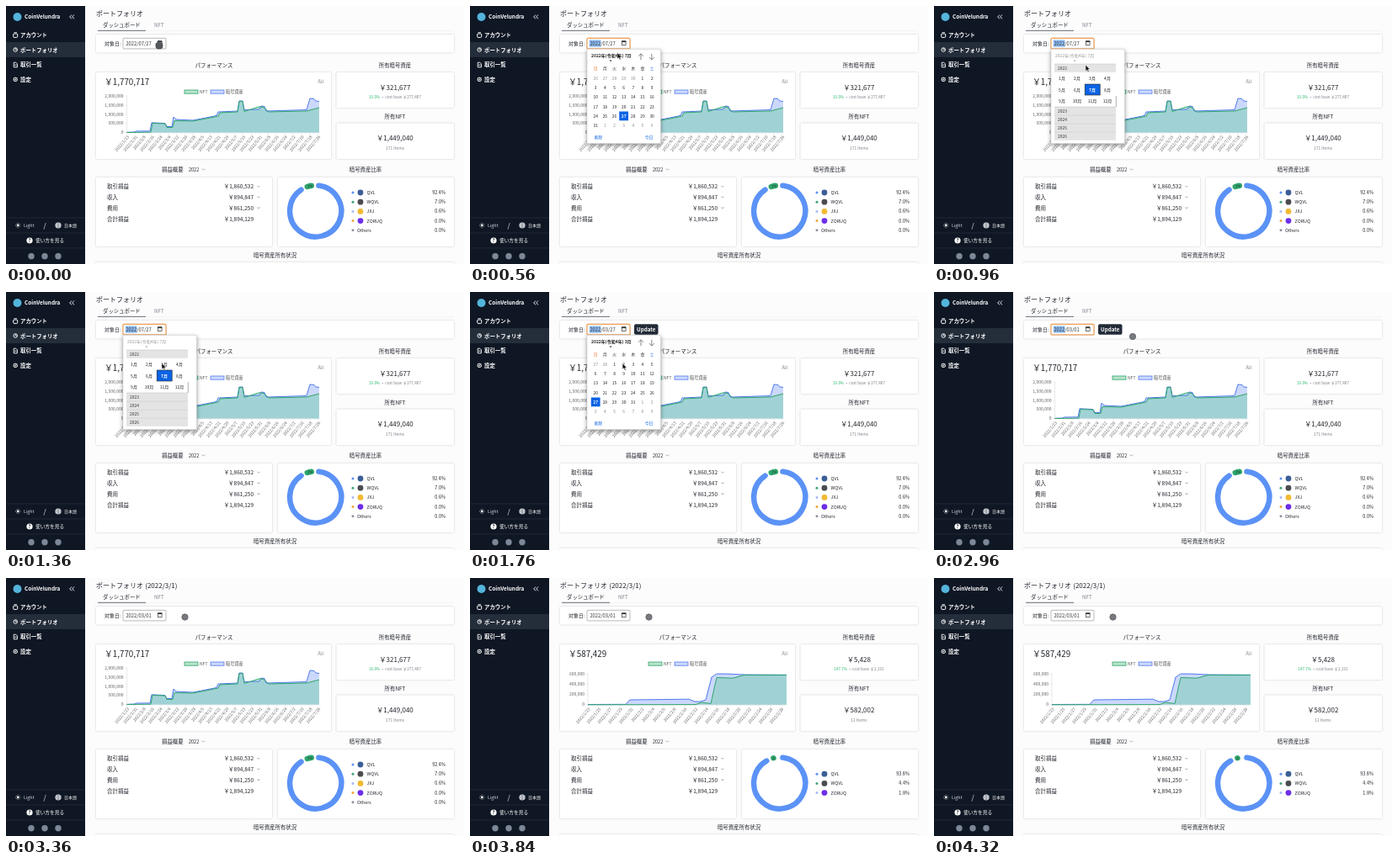
Write an HTML page that moves like this. It is 544x307 px and loops after 4.4 s.

```html
<!DOCTYPE html>
<html lang="ja">
<head>
<meta charset="utf-8">
<title>ポートフォリオ</title>
<style>
  html, body { margin: 0; width: 100%; height: 100%; overflow: hidden; background: #fcfcfd; }
  svg { display: block; width: 100vw; height: 100vh; }
  text { font-family: "Noto Sans CJK JP", "Noto Sans CJK", "Noto Sans", sans-serif; white-space: pre; }
  .card { fill: #fff; filter: drop-shadow(0 .6px .9px rgba(0,0,0,.2)); }
  .popup { fill: #fff; stroke: #c4c4c4; stroke-width: .5; filter: drop-shadow(0 2px 2.5px rgba(0,0,0,.4)); }
</style>
</head>
<body>
<svg id="stage" viewBox="0 0 544 307"></svg>
<script>
const LOOP = 4400, STEP = 80;
const INK = '#20242b', GRAY = '#7b818a', BLUE = '#5b92f6', GREEN = '#2fa56c', PICK = '#0b63e5';

const text = (x, y, s, size = 6.4, fill = INK, anchor = 'start', extra = '') =>
  `<text x="${x}" y="${y}" font-size="${size}" fill="${fill}" text-anchor="${anchor}" ${extra}>${s}</text>`;
const mid = (x, y, s, size, fill, extra) => text(x, y, s, size, fill, 'middle', extra);
const end = (x, y, s, size, fill, extra) => text(x, y, s, size, fill, 'end', extra);
const rect = (x, y, w, h, fill, extra = '') =>
  `<rect x="${x}" y="${y}" width="${w}" height="${h}" fill="${fill}" ${extra}/>`;
const card = (x, y, w, h) => `<rect class="card" x="${x}" y="${y}" width="${w}" height="${h}" rx="1.5"/>`;
const dot = (x, y, r, fill) => `<circle cx="${x}" cy="${y}" r="${r}" fill="${fill}"/>`;
const path = (d, stroke, width = .8, fill = 'none', extra = '') =>
  `<path d="${d}" stroke="${stroke}" stroke-width="${width}" fill="${fill}" ${extra}/>`;
const chevron = (x, y) => path(`M${x - 1.5} ${y - .8}l1.5 1.5l1.5-1.5`, GRAY, .7);
const range = (n, f) => Array.from({ length: n }, (_, i) => f(i)).join('');
const BOLD = 'font-weight="700"', MEDIUM = 'font-weight="500"';

// Layers are drawn in this order; each is visible from start to stop.
const layers = [];
const layer = (start, stop, markup) => layers.push({ start, stop, markup });

function sidebar() {
  const menu = ['アカウント', 'ポートフォリオ', '取引一覧', '設定'];
  const icons = [
    rect(8.7, 33, 5, 4.4, 'none', 'rx="1" stroke="#fff"') + path('M9.5 31.6h3.5', '#fff', .8),
    `<circle cx="11.2" cy="52" r="2.3" stroke="#fff" stroke-width=".9" fill="none"/>` + path('M11.2 50v2h2', '#fff'),
    path('M9.2 67.2h2.6l1.6 1.6v4h-4.2z M10 70.2h2.6', '#fff', .9),
    `<circle cx="11.2" cy="87.4" r="2.1" stroke="#fff" stroke-width="1.2" fill="none" stroke-dasharray="1.3 .35"/>` + dot(11.2, 87.4, .8, '#fff')
  ];
  const rule = y => path(`M0 ${y}H94`, '#2b3443', .6);
  return rect(0, 0, 94, 307, '#0f1724') + rect(0, 43, 94, 18, '#242d3a') +
    dot(13.5, 13, 5, '#55b4dc') +
    text(22, 15.4, 'CoinVelundra', 6.4, '#fff', 'start', BOLD) +
    path('M78 10.5l-2.3 2.4l2.3 2.4 M81 10.5l-2.3 2.4l2.3 2.4', '#fff', .9) +
    menu.map((s, i) => icons[i] + text(17, 37.2 + 17.6 * i, s, 6.4, '#fff', 'start', BOLD)).join('') +
    rule(252) + rule(270) + rule(288) +
    dot(14.2, 261, 1.4, '#fff') +
    range(8, i => path('M14.2 258.8v-1', '#fff', .6, 'none', `transform="rotate(${45 * i} 14.2 261)"`)) +
    text(21, 263, 'Light', 5.3, '#d5d9df') + mid(46, 264, '/', 8, '#fff') +
    dot(62, 261, 3.6, '#dfe2e6') + path('M58.4 261h7.2 M62 257.4v7.2 M59.5 259h5 M59.5 263h5', '#59616d', .5) +
    text(69, 263, '日本語', 5, '#fff') +
    dot(28, 279, 3.6, '#fff') + mid(28, 281, '?', 5.5, '#0f1724', BOLD) +
    text(35, 281.2, '使い方を見る', 5.7, '#fff') +
    dot(30, 297.8, 3.7, '#7c8797') + dot(46, 297.8, 3.7, '#7c8797') + dot(62, 297.8, 3.7, '#7c8797');
}

function frame() {
  const profit = [['取引損益', '￥1,860,532'], ['収入', '￥894,847'], ['費用', '￥861,250'], ['合計損益', '￥1,894,129']];
  return text(107, 12, 'ポートフォリオ', 8, INK, 'start', MEDIUM) +
    text(115, 25, 'ダッシュボード', 6.4) + text(176, 25, 'NFT', 6.2, GRAY) +
    path('M107 29.5H532', '#e8eaed', .5) + path('M109 29.3H166', '#414854', .8) +
    card(107, 34, 425, 21.5) + text(117, 47, '対象日:', 6) +
    mid(247, 73.4, 'パフォーマンス', 6.4, INK, MEDIUM) + card(107, 79, 279, 103) + end(377, 92, 'All', 5.5, GRAY) +
    mid(462, 73.4, '所有暗号資産', 6.4, INK, MEDIUM) + card(392.5, 79, 139.5, 42) +
    mid(462, 134, '所有NFT', 6.4, INK, MEDIUM) + card(392.5, 139.5, 139.5, 42.5) +
    text(185, 197, '損益概要', 6.4, INK, 'start', MEDIUM) + text(217, 196.6, '2022', 5.5) + chevron(234.5, 194.5) +
    card(107, 204, 209, 82) +
    profit.map(([k, v], i) => text(120, 217.2 + 12.8 * i, k, 6.5) + end(294, 217.2 + 12.8 * i, v, 6.5, INK, MEDIUM) +
      (i < 3 ? chevron(300, 214.7 + 12.8 * i) : '')).join('') +
    mid(427, 197, '暗号資産比率', 6.4, INK, MEDIUM) + card(323, 204, 209, 82) +
    mid(319.5, 299, '暗号資産所有状況', 6.4, INK, MEDIUM) + card(107, 305, 425, 20);
}

function chart({ left, right, base, ticks, top, labels, days, step, blue, green }) {
  const line = p => 'M' + p.map(q => q.join(' ')).join('L');
  const area = p => `${line(p)}V${base}H${p[0][0]}Z`;
  const gap = (base - top) / (ticks.length - 1);
  const key = (x, fill, stroke) => rect(x, 100, 16, 4.2, fill, `stroke="${stroke}" stroke-width=".8"`);
  const day = i => {
    const d = new Date(2022, 0, 23 + i * step);
    return `2022/${d.getMonth() + 1}/${d.getDate()}`;
  };
  return key(212, '#b9e3cc', GREEN) + text(230, 104, 'NFT', 5, '#555') +
    key(243, '#cbd8fd', '#557ef0') + text(261, 104, '暗号資産', 5.2, '#555') +
    ticks.map((s, i) => end(left - 4, base + 1.4 - gap * i, s, 5, '#666') + path(`M${left - 2.5} ${base - gap * i}h2.5`, '#ddd', .4)).join('') +
    path(`M${left} ${top - 2}V${base + .3}H${right}`, '#cfd2d6', .5) +
    range(labels, i => {
      const x = left + (right - left) * i * step / days;
      return path(`M${x} ${base}v2.5`, '#ddd', .4) +
        end(0, 0, day(i), 4.9, '#666', `transform="translate(${x + 3} ${base + 5.4}) rotate(-50)"`);
    }) +
    path(area(blue), 'none', 0, 'rgba(85,126,240,.3)') + path(area(green), 'none', 0, 'rgba(100,200,160,.42)') +
    path(line(blue), '#5079ee', 1) + path(line(green), GREEN, 1);
}

function arc(from, to, color) {
  const at = a => {
    const r = a * Math.PI / 180;
    return `${367.7 + 30.6 * Math.sin(r)} ${244 - 30.6 * Math.cos(r)}`;
  };
  return path(`M${at(from)}A30.6 30.6 0 ${to - from > 180 ? 1 : 0} 1 ${at(to)}`, color, 6.4, 'none', 'stroke-linecap="round"');
}

const dots = { QVL: BLUE, WQVL: '#3fa27b', JXJ: '#a9b8f8', ZORUQ: '#f2a33a', Others: '#8b93a0' };
const tokens = { QVL: '#3b5f97', WQVL: '#4a4c50', JXJ: '#f1b932', ZORUQ: '#6d2ee8' };
const shares = (rows, y) => rows.map(([name, pct, mark], i) => {
  const cy = y + 11.2 * i;
  return dot(412, cy, 1.5, mark || dots[name]) +
    (tokens[name] ? dot(421, cy, 3.4, tokens[name]) : '') +
    text(tokens[name] ? 428.5 : 417, cy + 2, name, 5.4) + end(522, cy + 2, pct, 5.5);
}).join('');

const summary = (total, coins, gain, cost, nft, items) =>
  text(117, 94, total, 9.8, INK, 'start', MEDIUM) +
  mid(462, 99.6, coins, 8, INK, MEDIUM) +
  mid(462, 110, `<tspan fill="#2eb872">${gain}</tspan>  •  cost base ${cost}`, 4.7, GRAY) +
  mid(462, 160, nft, 8, INK, MEDIUM) + mid(462, 171.2, items, 4.9, GRAY);

const julyView = () =>
  summary('￥1,770,717', '￥321,677', '16.0%', '￥277,407', '￥1,449,040', '171 Items') +
  chart({
    left: 143.5, right: 372, base: 150.5, top: 108, ticks: ['0', '500,000', '1,000,000', '1,500,000', '2,000,000'],
    labels: 24, days: 185, step: 8,
    blue: [[143.5, 150.3], [153, 150], [154, 149], [171, 148.8], [173, 138.8], [189, 139.6], [191, 143.5], [197, 143.5], [199, 132],
      [202, 135], [222, 136], [240, 132.5], [250, 130.5], [252, 126], [275, 125], [277, 113], [281, 113], [283, 123.5],
      [301, 123], [303, 119], [307, 119.5], [309, 125], [357, 123.5], [361, 110], [366, 110.5], [368, 113], [372, 113.5]],
    green: [[143.5, 150.5], [172, 150.2], [174, 139.5], [189, 140], [191, 144.5], [198, 144.5], [200, 136.5], [222, 137], [240, 133.5],
      [252, 131], [254, 127], [275, 126], [277, 113.5], [281, 113.5], [283, 125.5], [301, 119.8], [306, 120.5], [312, 126], [357, 125], [372, 121]]
  }) +
  arc(7, 326, BLUE) + arc(341, 351, GREEN) + mid(361, 216, '7%', 4, INK, 'transform="rotate(-14 361 214)"') +
  shares([['QVL', '92.4%'], ['WQVL', '7.0%'], ['JXJ', '0.6%'], ['ZORUQ', '0.0%'], ['Others', '0.0%']], 222);

const marchView = () =>
  summary('￥587,429', '￥5,428', '147.7%', '￥2,191', '￥582,002', '12 Items') +
  chart({
    left: 140, right: 376, base: 150.8, top: 115, ticks: ['0', '200,000', '400,000', '600,000'],
    labels: 19, days: 37, step: 2,
    blue: [[140, 150.5], [185, 150.3], [190, 145], [260, 144.2], [267, 147], [274, 147], [280, 145], [287, 118], [293, 114], [303, 114], [326, 115], [376, 115.3]],
    green: [[140, 150.8], [268, 150.6], [275, 148], [286, 149.5], [293, 118.5], [312, 119.2], [325, 115.6], [376, 115.6]]
  }) +
  arc(7, 330, BLUE) + arc(346, 346.5, GREEN) + mid(360.6, 216, '4', 4, INK) +
  shares([['QVL', '93.8%'], ['WQVL', '4.4%'], ['ZORUQ', '1.8%', dots.JXJ]], 233.2);

const dateIcon = rect(180.3, 41.8, 4.8, 4.8, 'none', 'stroke="#333" stroke-width=".7"') + rect(180.3, 41.5, 4.8, 1.6, '#333');
const field = (stroke, width) => rect(139, 38.3, 51, 12.6, '#fff', `rx="1" stroke="${stroke}" stroke-width="${width}"`) + dateIcon;
const button = rect(195, 38.2, 28.5, 12.6, '#222b38', 'rx="2"') + mid(209.2, 46.9, 'Update', 6.2, '#fff', BOLD);
const popup = '<rect class="popup" x="139" y="51.2" width="87.5" height="112.5"/>';
const heading = (month, fill, extra) => text(144, 60.8, `2022年(令和4年) ${month}月`, 5, fill, 'start', extra) +
  path('M165.5 64.6h3l-1.5 1.7z', 'none', 0, fill);

function calendar(month, picked) {
  const col = i => 149.2 + 11.15 * i, row = i => 86.3 + 11.15 * i;
  const first = new Date(2022, month - 1, 1).getDay();
  const cell = i => {
    const d = new Date(2022, month - 1, 1 - first + i);
    const inside = d.getMonth() === month - 1, on = inside && d.getDate() === picked;
    const x = col(i % 7), y = row(Math.floor(i / 7));
    return (on ? rect(x - 5.4, y - 5.4, 10.8, 10.8, PICK) : '') +
      mid(x, y + 1.8, d.getDate(), 4.9, on ? '#fff' : inside ? '#222' : '#8c8c8c', on ? BOLD : '');
  };
  return popup + heading(month, '#222', BOLD) +
    path('M203 64v-7.2 M200 59.8l3-3l3 3 M215.8 56.8v7.2 M212.8 61l3 3l3-3', '#666', .8) +
    [...'日月火水木金土'].map((s, i) => mid(col(i), 76.2, s, 5, i === 0 ? '#ee7a3c' : i === 6 ? '#3c6fe0' : '#333')).join('') +
    range(42, cell) + mid(152.5, 157.6, '削除', 4.8, PICK) + mid(212.5, 157.6, '今日', 4.8, PICK);
}

function monthPicker() {
  const band = (y, s) => rect(143, y, 73, 9.8, '#e4e4e4') + path(`M143 ${y}h73`, '#bdbdbd', .5) + text(147, y + 6.8, s, 4.9, '#333');
  return popup + heading(7, '#999', '') + band(69, '2022') +
    rect(179.2, 93, 18, 13, PICK, 'stroke="#222" stroke-width=".6"') +
    range(12, i => mid(152 + 18 * (i % 4), 88 + 13.5 * Math.floor(i / 4), `${i + 1}月`, 5, i === 6 ? '#fff' : '#222', i === 6 ? BOLD : '')) +
    range(4, i => band(120 + 10 * i, 2023 + i)) + path('M216.3 107v13', '#aaa', .9);
}

const OPEN = 240, MONTHS = 720, MARCH = 1520, FIRST = 2400, APPLY = 3200, LOADED = 3840;
const date = s => text(142.4, 46.8, s, 5.8, '#333');

layer(0, LOOP, sidebar() + frame());
layer(APPLY, LOOP, text(165.2, 12, '(2022/3/1)', 8, INK, 'start', MEDIUM));
layer(0, LOADED, julyView());
layer(LOADED, LOOP, marchView());
layer(0, LOOP, field('#9b9b9b', .7));
layer(OPEN, APPLY, field('#f0a35c', 1.2) + rect(141.8, 40.4, 13.6, 8.2, '#8dbcf5'));
layer(0, MARCH, date('2022/07/27'));
layer(MARCH, FIRST, date('2022/03/27'));
layer(FIRST, LOOP, date('2022/03/01'));
layer(MARCH, APPLY, button);
layer(OPEN, MONTHS, calendar(7, 27));
layer(MONTHS, MARCH, monthPicker());
layer(MARCH, FIRST, calendar(3, 27));

const hand = path('M-1.2-4.5h1.6v2.2h2.2q1.4.3 1.4 2v2.6q0 2.7-3.4 2.7h-1.7q-2.9 0-3-3.2v-2.3q.1-1.7 1.6-1.8z', '#333', .6, '#55585d');
const disc = '<circle r="3.7" fill="#777a7f" stroke="#55585d" stroke-width=".7"/>';
const arrow = path('M-1.5-3.5v7.4l1.7-1.5l1.2 2.7l1.2-.6l-1.2-2.5h2.3z', '#fff', .5, '#111');
const pointers = [[0, OPEN, hand], [OPEN, FIRST, arrow], [FIRST, LOOP, disc]];
// time, x, y
const route = [[0, 182, 46], [240, 182, 46], [480, 176.5, 59], [720, 176.5, 59], [1200, 186.5, 88], [1600, 186.5, 88],
  [2080, 171.5, 88.5], [2480, 171.5, 88.5], [2880, 236, 53], [2960, 236, 53], [3200, 212.5, 46.5], [LOOP, 212.5, 46.5]];

const stage = document.getElementById('stage');
stage.innerHTML = layers.map(l => `<g>${l.markup}</g>`).join('') +
  `<g id="pointer">${pointers.map(p => `<g>${p[2]}</g>`).join('')}</g>`;
const pointer = document.getElementById('pointer');
const show = (el, on) => { el.style.display = on ? '' : 'none'; };

function position(t) {
  const i = route.findIndex(k => k[0] > t);
  const [t0, x0, y0] = route[i - 1], [t1, x1, y1] = route[i];
  const p = (t - t0) / (t1 - t0), e = p * p * (3 - 2 * p);
  return [x0 + (x1 - x0) * e, y0 + (y1 - y0) * e];
}

function draw(t) {
  layers.forEach((l, i) => show(stage.children[i], t >= l.start && t < l.stop));
  pointers.forEach(([from, to], i) => show(pointer.children[i], t >= from && t < to));
  pointer.setAttribute('transform', `translate(${position(t).join(' ')})`);
}

const began = performance.now();
function tick() {
  const t = (performance.now() - began) % LOOP;
  draw(Math.floor(t / STEP) * STEP);
  requestAnimationFrame(tick);
}
tick();
</script>
</body>
</html>
```
